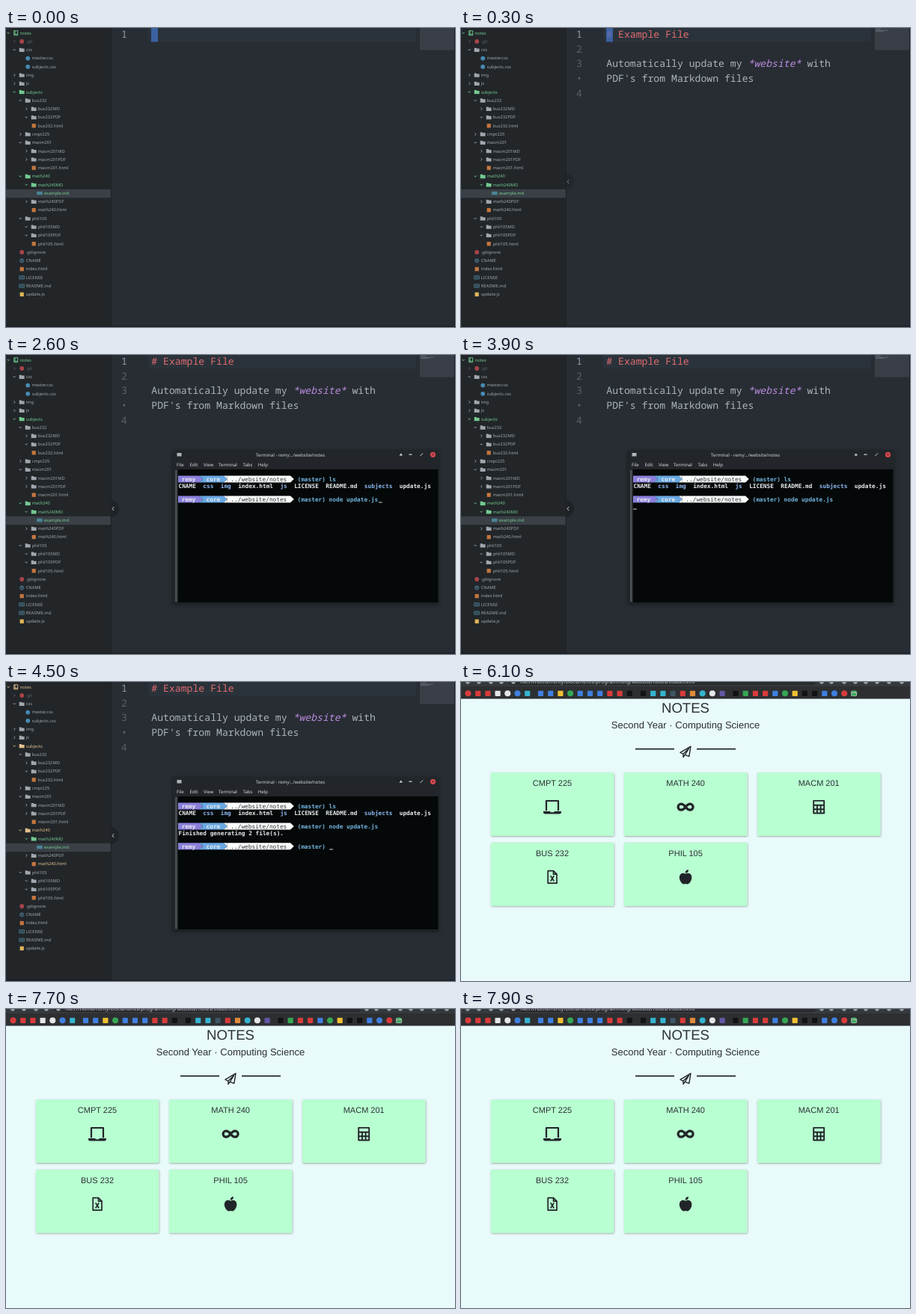
An HTML page for the animation above (8000 ms loop, 600 by 400 pixels).

```html
<!DOCTYPE html>
<html lang="en">
<head>
<meta charset="utf-8">
<title>Notes workflow</title>
<style>
html, body { margin: 0; width: 100%; height: 100%; overflow: hidden; background: #282d34; }
svg { display: block; width: 100%; height: 100%; }
text { white-space: pre; text-rendering: geometricPrecision; }
.ui { font-family: "Noto Sans", "Open Sans", sans-serif; }
.code { font: 500 13.15px "Noto Sans Mono", "DejaVu Sans Mono", monospace; fill: #abb3bb; }
.number { font-weight: 400; fill: #596069; text-anchor: end; }
.shell { font: bold 7.79px "DejaVu Sans Mono", monospace; fill: #e9ecee; }
.site { font-family: "Liberation Sans", Arial, sans-serif; fill: #2b3034; text-anchor: middle; }
.line { fill: none; stroke: currentColor; }

#tree { font-size: 5.75px; color: #a1a7ae; }
#tree text { fill: currentColor; }
#tree .dim { color: #5d636c; }
#tree .new { color: #73c990; }
#tree .stale { animation: stale 8s step-end infinite; }
#tree .edited { animation: edited 8s step-end infinite; }

#pasted { animation: paste 8s step-end infinite; }
#caret { animation: caret 8s step-end infinite; }
#handle { animation: handle 8s linear infinite; }
#terminal { animation: terminal 8s step-end infinite; }
#output { animation: output 8s step-end infinite; }
#prompt { animation: prompt 8s step-end infinite; }
#cursor { animation: cursor 8s step-end infinite; }
#page { animation: page 8s step-end infinite; }

@keyframes stale { 0% { color: #73c990; } 56.25%, to { color: #e2c08d; } }
@keyframes edited { 0% { color: #a1a7ae; } 56.25%, to { color: #e2c08d; } }
@keyframes paste { 0% { opacity: 0; } 1.25%, to { opacity: 1; } }
@keyframes caret { 0% { opacity: 1; } 32.5%, to { opacity: 0; } }
@keyframes handle { 0%, 1.25% { opacity: 0; } 6.25%, to { opacity: 1; } }
@keyframes terminal { 0% { opacity: 0; } 32.5%, to { opacity: 1; } }
@keyframes output { 0% { opacity: 0; } 52.5%, to { opacity: 1; } }
@keyframes prompt { 0% { opacity: 0; } 56.25%, to { opacity: 1; } }
@keyframes page { 0% { opacity: 0; } 76.25%, to { opacity: 1; } }
@keyframes cursor {
  0% { transform: translate(498px, 196.6px); }
  48.75% { transform: translate(230px, 205.6px); }
  52.5% { transform: translate(230px, 214.6px); }
  56.25%, to { transform: translate(432.2px, 223.4px); }
}
</style>
</head>
<body>
<svg viewBox="0 0 600 400" preserveAspectRatio="none">
  <defs>
    <filter id="cardShadow" x="-5%" y="-5%" width="110%" height="115%">
      <feDropShadow dx=".5" dy=".8" stdDeviation="1" flood-opacity=".42"/>
    </filter>
    <filter id="windowShadow" x="-5%" y="-5%" width="110%" height="115%">
      <feDropShadow dx="0" dy="1.5" stdDeviation="2.5" flood-opacity=".5"/>
    </filter>
  </defs>

  <g id="editor">
    <rect width="600" height="400" fill="#282d34"/>
    <rect x="190" width="358" height="18.5" fill="#2a323a"/>
    <rect x="553" width="46" height="29.5" fill="#3a3e46"/>
    <text class="code number" x="162" y="13.2" style="fill:#9199a2">1</text>
    <g id="pasted">
      <text class="code number" x="162" y="32.7">2</text>
      <text class="code number" x="162" y="52.3">3</text>
      <text class="code number" x="162" y="72">•</text>
      <text class="code number" x="162" y="91.7">4</text>
      <g class="code">
        <text x="194.3" y="13.2" fill="#e06c70"># Example File</text>
        <text x="194.3" y="52.3">Automatically update my <tspan fill="#b98bdc" font-style="italic">*website*</tspan> with</text>
        <text x="194.3" y="72">PDF's from Markdown files</text>
      </g>
      <path d="M554 1.2h7M554 3.2h17M554 4.2h11" stroke="#747a84" stroke-width=".7"/>
    </g>
    <rect id="caret" x="194" width="9" height="18.5" fill="#4272c4" fill-opacity=".75"/>
  </g>

  <g id="tree" class="ui">
    <rect width="140" height="400" fill="#222629"/>
    <rect y="215.8" width="140" height="11.4" fill="#3a4046"/>
    <path d="M140.3 0V400" stroke="#1d2125" stroke-width="1"/>
  </g>
  <path d="M0 399.2H600M599.6 0V400" stroke="#1b1e22" stroke-width="1.2"/>
  <g id="handle">
    <path d="M139.5 194a11.6 11.6 0 0 1 0 23.2z" fill="#1f2327"/>
    <path d="M144.2 203.2l-2.2 2.4 2.2 2.4" fill="none" stroke="#d2d6db" stroke-width="1"/>
  </g>

  <g id="terminal">
    <rect x="223" y="127" width="355.5" height="205" rx="1.5" fill="#24282b" filter="url(#windowShadow)"/>
    <rect x="230" y="153" width="347.5" height="178" fill="#050808"/>
    <path d="M227.3 154V330" stroke="#555b5e" stroke-width="2"/>
    <g class="ui" font-size="6.1" fill="#d5d9db">
      <text x="380" y="135.5" text-anchor="middle">Terminal - remy:../website/notes</text>
      <text x="228" y="148.7">File</text>
      <text x="245.5" y="148.7">Edit</text>
      <text x="264" y="148.7">View</text>
      <text x="284" y="148.7">Terminal</text>
      <text x="316.5" y="148.7">Tabs</text>
      <text x="336.8" y="148.7">Help</text>
    </g>
    <path d="M228.5 131h6v4.5h-6z" fill="#aeb4b8"/>
    <path d="M525.5 134.5l2.3-3 2.3 3zM538.5 132.5h4v1.2h-4z" fill="#d5d9db"/>
    <path d="M553.5 135l3.5-3.5" stroke="#d5d9db"/>
    <circle cx="570.5" cy="133.3" r="3.6" fill="#d8494f"/>
    <path d="M569.3 132.1l2.4 2.4m0-2.4l-2.4 2.4" stroke="#3a2224" stroke-width=".8"/>
    <g id="history" class="shell"></g>
    <g id="output" class="shell"><text x="230.5" y="204.8">Finished generating 2 file(s).</text></g>
    <g id="prompt" class="shell"></g>
    <rect id="cursor" width="4.7" height="1" fill="#d5d9db"/>
  </g>

  <g id="page">
    <rect width="600" height="400" fill="#e9fafb"/>
    <rect width="600" height="22.5" fill="#2d2f31"/>
    <rect width="600" height="6" fill="#36393b"/>
    <rect x="63" y="-10" width="412" height="14" rx="6" fill="#292b2d"/>
    <text class="ui" x="79" y="1.6" font-size="7" fill="#c9ccce">file:///home/remy/Documents/programming/website/notes/index.html</text>
    <g id="bookmarks"></g>
    <g class="site">
      <text x="300" y="40.5" font-size="18.6">NOTES</text>
      <text x="300" y="61.6" font-size="13.04">Second Year · Computing Science</text>
    </g>
    <g color="#212529">
      <path class="line" d="M233 89.6h52M315 89.6h52" stroke-width="1.7"/>
      <path class="line" d="M307 86.2L293 94.3l4 2 7.5-7.3-5.2 8.3 5.5 2.3zM297 96.3v4.2l2.3-3.2" stroke-width="1.4" stroke-linejoin="round"/>
      <g id="cards"></g>
    </g>
  </g>
</svg>

<script>
const byId = id => document.getElementById(id);

// Folder tree: depth + arrow, icon, label, state
const rows = `0v repo notes stale
1> git .git dim
1v folder css
2- css master.css
2- css subjects.css
1> folder img
1> folder js
1v folder subjects stale
2v folder bus232
3> folder bus232MD
3v folder bus232PDF
3- html bus232.html
2> folder cmpt225
2v folder macm201
3> folder macm201MD
3> folder macm201PDF
3- html macm201.html
2v folder math240 stale
3v folder math240MD new
4- md example.md new
3> folder math240PDF
3- html math240.html edited
2v folder phil105
3v folder phil105MD
3v folder phil105PDF
3- html phil105.html
1- git .gitignore
1- globe CNAME
1- html index.html
1- book LICENSE
1- book README.md
1- js update.js`.split("\n").map(row => row.split(" "));

const square = fill => `<rect x=".9" y="-2.7" width="5.2" height="5.4" fill="${fill}"/>`;
const disc = fill => `<circle cx="3.5" r="2.9" fill="${fill}"/>`;
const icons = {
  folder: '<path d="M0-2.6h2.8l.8.9h3.3v4.4h-6.900z" fill="currentColor"/>',
  repo: '<path class="line" d="M1-3h5v6h-5zM1 1.5h5M2.3-3v4.5" stroke-width=".9"/>',
  book: '<path class="line" d="M0-2.2h3.3v4.3h-3.3zM3.3-2.2h3.4v4.3h-3.4M1-.7h1.4M4.3-.7h1.4M1 .6h1.4M4.3.6h1.4" stroke-width=".8" color="#4f8199"/>',
  globe: '<circle class="line" cx="3.5" r="2.5" color="#4f8199"/><path d="M1.600-1.500l3 .4-1 2.700z" fill="#4f8199"/>',
  git: disc("#a84448"),
  css: disc("#478bb3"),
  html: square("#c4763f"),
  md: '<rect x="-.6" y="-2.2" width="7.600" height="4.4" fill="#4a8594"/>',
  js: square("#e0b659"),
};
const arrows = { v: "M-8-.9l1.5 1.700 1.500-1.700", ">": "M-7.2-1.6l1.7 1.6-1.7 1.6" };

byId("tree").innerHTML += rows.map(([head, icon, label, state = ""], i) => {
  const arrow = arrows[head[1]];
  return `<g class="${state}" transform="translate(${9.7 + 8 * head[0]} ${6.7 + 11.28 * i})">
    ${arrow ? `<path class="line" d="${arrow}" stroke-width=".9"/>` : ""}
    ${icons[icon]}<text x="9" y="1.9">${label}</text></g>`;
}).join("");

// Shell prompt, measured in character cells
const cell = 4.69;
const col = n => 230 + n * cell;

function promptLine(y, command) {
  const segment = (from, to, fill) =>
    `<path d="M${col(from)} ${y - 7.2}H${col(to)}l${cell} 4.5-${cell} 4.5H${col(from)}z" fill="${fill}"/>`;
  const divider = (at, fill) =>
    `<path d="M${col(at)} ${y - 7.2}h${cell}v9h-${cell}l${cell}-4.5z" fill="${fill}"/>`;
  return segment(14, 32, "#fbfcfc") + segment(7, 13, "#6aa9e2") + segment(0, 6, "#8a7fdb") +
    divider(13, "#fbfcfc") + divider(6, "#6aa9e2") +
    `<text x="${col(1)}" y="${y}">remy</text>
     <text x="${col(8)}" y="${y}">core</text>
     <text x="${col(15)}" y="${y}" fill="#30363a" font-weight="normal">../website/notes</text>
     <text x="${col(34)}" y="${y}" fill="#72b4df">(master) ${command}</text>`;
}

const folders = ["css", "img", "js", "subjects"];
const listing = "CNAME css img index.html js LICENSE README.md subjects update.js".split(" ")
  .map(name => folders.includes(name) ? `<tspan fill="#8db9f2">${name}</tspan>` : name).join("  ");

byId("history").innerHTML = promptLine(168.8, "ls") +
  `<text x="230.5" y="177.8">${listing}</text>` + promptLine(195.7, "node update.js");
byId("prompt").innerHTML = promptLine(222.5, "");

// Bookmark bar: groups of plain marks, capitals are round
const palette = {
  r: "#d93b3b", b: "#3f7fe0", c: "#35b3cf", g: "#35a853", y: "#efc032",
  w: "#e4e6e8", k: "#111314", d: "#3d5566", o: "#e08a3c", p: "#6257a5",
};
const groups = [[9.5, "RrrwWBc"], [106.5, "bbyGbbbrrk"], [243.5, "kccdroCWp"], [367, "kgrrbGykkbBRG"]];
const mark = (x, key) => {
  const fill = palette[key.toLowerCase()];
  return key < "a"
    ? `<circle cx="${x}" cy="15.3" r="4" fill="${fill}"/>`
    : `<rect x="${x - 3.6}" y="11.7" width="7.2" height="7.2" rx=".8" fill="${fill}"/>`;
};
byId("bookmarks").innerHTML =
  groups.map(([x, keys]) => [...keys].map((key, i) => mark(x + i * 13.2, key)).join("")).join("") +
  '<path class="line" d="M521.5 12.5h2.5l1 1h3.5v5h-7zM521.5 14.7h7" color="#b9bdc0" stroke-width=".8"/>' +
  [9, 24, 40, 54, 70, 482, 495, 512, 527, 541, 556, 572, 589]
    .map(x => `<circle cx="${x}" cy="0" r="2.7" fill="#9a9fa3"/>`).join("");

// Course cards, icons drawn around their own centre
const cards = [
  ["CMPT 225", '<path class="line" d="M-8 5v-13.2h16v13.2" stroke-width="2.2" stroke-linejoin="round"/><path d="M-12 5.8h9l1 1.2h4l1-1.2h9v1.2q0 2.4-2.4 2.4h-19.2q-2.4 0-2.4-2.4z" fill="currentColor"/>'],
  ["MATH 240", '<path class="line" d="M0 0c-2.5-3.2-4.2-4-6-4a4 4 0 0 0 0 8c1.8 0 3.5-.8 6-4s4.2-4 6-4a4 4 0 0 1 0 8c-1.8 0-3.5-.8-6-4z" stroke-width="3.2"/>'],
  ["MACM 201", '<path class="line" d="M-7-8.3h14v16.6h-14zM-7-2.4h14M-7 3h14M-2.3-2.4v10.7M2.4-2.4v10.7" stroke-width="1.9" stroke-linejoin="round"/>'],
  ["BUS 232", '<path class="line" d="M-5.8-8.3h7.3l4.5 4.5v12.1h-11.8zM1.5-8.3v4.5h4.5" stroke-width="1.7" stroke-linejoin="round"/><path class="line" d="M-2.3-1.6l4.6 7.2m0-7.2l-4.6 7.2" stroke-width="1.6"/>'],
  ["PHIL 105", '<path d="M0-4.2c2-1.2 4.5-1.4 6.3 0 2.3 2 2.4 5.5 1.2 8.5-1.3 3.3-3.5 5.5-5.5 5.2-1-.2-1.3-.5-2-.5s-1 .3-2 .5c-2 .3-4.2-1.9-5.5-5.2-1.2-3-1.1-6.5 1.2-8.5 1.8-1.4 4.3-1.2 6.3 0zM-.4-5.3c-.2-2.5 1.3-4.6 4.3-4.4.2 2.7-1.5 4.5-4.3 4.4z" fill="currentColor"/>'],
];
byId("cards").innerHTML = cards.map(([title, icon], i) =>
  `<g transform="translate(${122 + 178.1 * (i % 3)} ${121.2 + 93.7 * Math.floor(i / 3)})">
    <rect x="-82.2" width="164.4" height="84.5" rx="1.5" fill="#b8ffd1" filter="url(#cardShadow)"/>
    <text class="site" y="18.3" font-size="11">${title}</text>
    <g transform="translate(0 46)">${icon}</g></g>`).join("");
</script>
</body>
</html>
```
